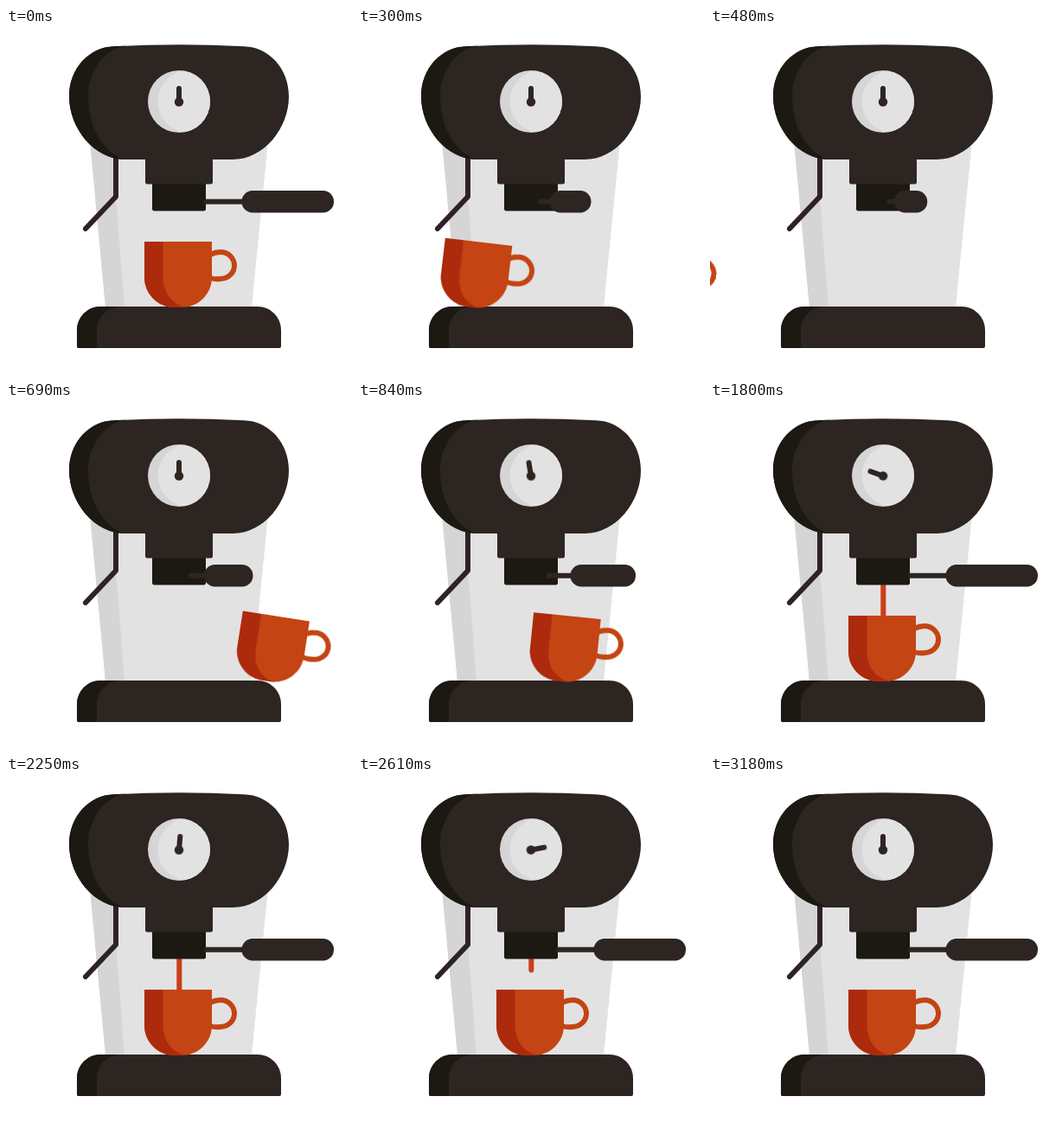
An HTML page for the animation above (3210 ms loop, 400 by 400 pixels).

```html
<!DOCTYPE html>
<html lang="en">
<head>
<meta charset="utf-8">
<title>Coffee machine</title>
<style>
  html, body { margin: 0; width: 100%; height: 100%; overflow: hidden; background: #fff; }
  svg { display: block; width: 100vw; height: 100vh; }

  .dark { fill: #2d2522; }
  .shadow { fill: #1c1812; }
  .light { fill: #e2e2e2; }
  .shade { fill: #d5d5d5; }
  .cup-light { fill: #c44413; }
  .cup-dark { fill: #ad2a0c; }
  .line { fill: none; stroke-width: 6; stroke-linecap: round; stroke-linejoin: round; }

  .slide, .tilt, .needle, .stream, .rod, .grip { animation: 3.21s infinite both; }

  .slide { animation-name: slide; }
  @keyframes slide {
    0% { transform: none; animation-timing-function: cubic-bezier(.333, 0, .667, 0); }
    15.42% { transform: translateX(-284px); animation-timing-function: step-start; }
    15.888% { transform: translateX(262px); animation-timing-function: cubic-bezier(.333, 1, .667, 1); }
    37.85%, 100% { transform: none; }
  }

  .tilt { animation-name: tilt; transform-origin: 199px 285px; }
  .tilt, .needle, .rod, .grip { animation-timing-function: cubic-bezier(.333, 0, .667, 1); }
  @keyframes tilt {
    0%, 37.85%, 100% { transform: rotate(0deg); }
    15.888% { transform: rotate(10.6deg); }
  }

  /* the filter handle turns toward the viewer and back */
  .rod { animation-name: rod; }
  @keyframes rod {
    0%, 37.85%, 100% { x: 229px; width: 50px; }
    12.617% { x: 204px; width: 14px; }
  }
  .grip { animation-name: grip; }
  @keyframes grip {
    0%, 37.85%, 100% { x: 272.5px; width: 106.5px; }
    12.617% { x: 211.5px; width: 36.5px; }
  }

  .needle { animation-name: needle; transform-origin: 200px 85.5px; }
  @keyframes needle {
    0%, 24.3% { transform: rotate(0deg); }
    36.45% { transform: rotate(-140deg); }
    56.07%, 58.88% { transform: rotate(-70deg); }
    81.31% { transform: rotate(79deg); }
    99.07%, 100% { transform: rotate(0deg); }
  }

  .stream { animation-name: stream; animation-timing-function: linear; }
  @keyframes stream {
    0%, 31.78% { transform: translateY(-45px); }
    34.89%, 77.88% { transform: none; }
    84.74%, 100% { transform: translateY(-45px); }
  }
</style>
</head>
<body>
<svg viewBox="0 0 400 400">
  <defs>
    <clipPath id="dial"><circle cx="200" cy="85" r="36"/></clipPath>
  </defs>

  <path class="light" d="M97 130H303L284 323H115Z"/>
  <path class="shade" d="M97 130H122L137 323H115Z"/>
  <path class="line" stroke="#2e2226" d="M127 148V195L92 232"/>

  <path class="stream line" stroke="#cb3d1a" d="M200.3 205V247"/>

  <rect class="shadow" x="169" y="178" width="62" height="33.6" rx="2.5"/>
  <rect class="dark" x="161" y="140" width="78" height="40.6" rx="2.5"/>
  <rect class="rod dark" x="229" y="197.75" width="50" height="6" rx="2"/>
  <rect class="grip dark" x="272.5" y="188" width="106.5" height="25.5" rx="12.5"/>

  <path class="dark" d="M138 152H262C298 152 327 116 327 79C327 47 304 22 275 21.3Q200 17 125 21.3C96 22 73 47 73 79C73 116 102 152 138 152Z"/>
  <path class="shadow" d="M138 152C102 152 73 116 73 79C73 47 96 22 125 21.3L140 20.6C117 22 95 47 95 79C95 112 111 145 138 152Z"/>

  <circle class="shade" cx="200" cy="85" r="36"/>
  <circle class="light" cx="212" cy="85" r="36.5" clip-path="url(#dial)"/>
  <g class="needle">
    <path class="line" stroke="#2d2522" d="M200 85.5V70"/>
    <circle class="dark" cx="200" cy="85.5" r="5.2"/>
  </g>

  <path class="dark" d="M82 368V349A27 27 0 0 1 109 322H291A27 27 0 0 1 318 349V368Q318 370 316 370H84Q82 370 82 368Z"/>
  <path class="shadow" d="M82 368V349A27 27 0 0 1 109 322H132A27 27 0 0 0 105 349V370H84Q82 370 82 368Z"/>

  <g class="slide">
    <g class="tilt">
      <path class="line" stroke="#c44413" d="M236 262Q242 259 248 259A16 15.5 0 0 1 248 290Q242 291 236 289"/>
      <path class="cup-light" d="M160 247H238V288C238 308 222 323 203 323H195C176 323 160 308 160 288Z"/>
      <path class="cup-dark" d="M160 247H181.5V288C181.5 307 193 321 210 323H195C176 323 160 308 160 288Z"/>
    </g>
  </g>
</svg>
</body>
</html>
```
